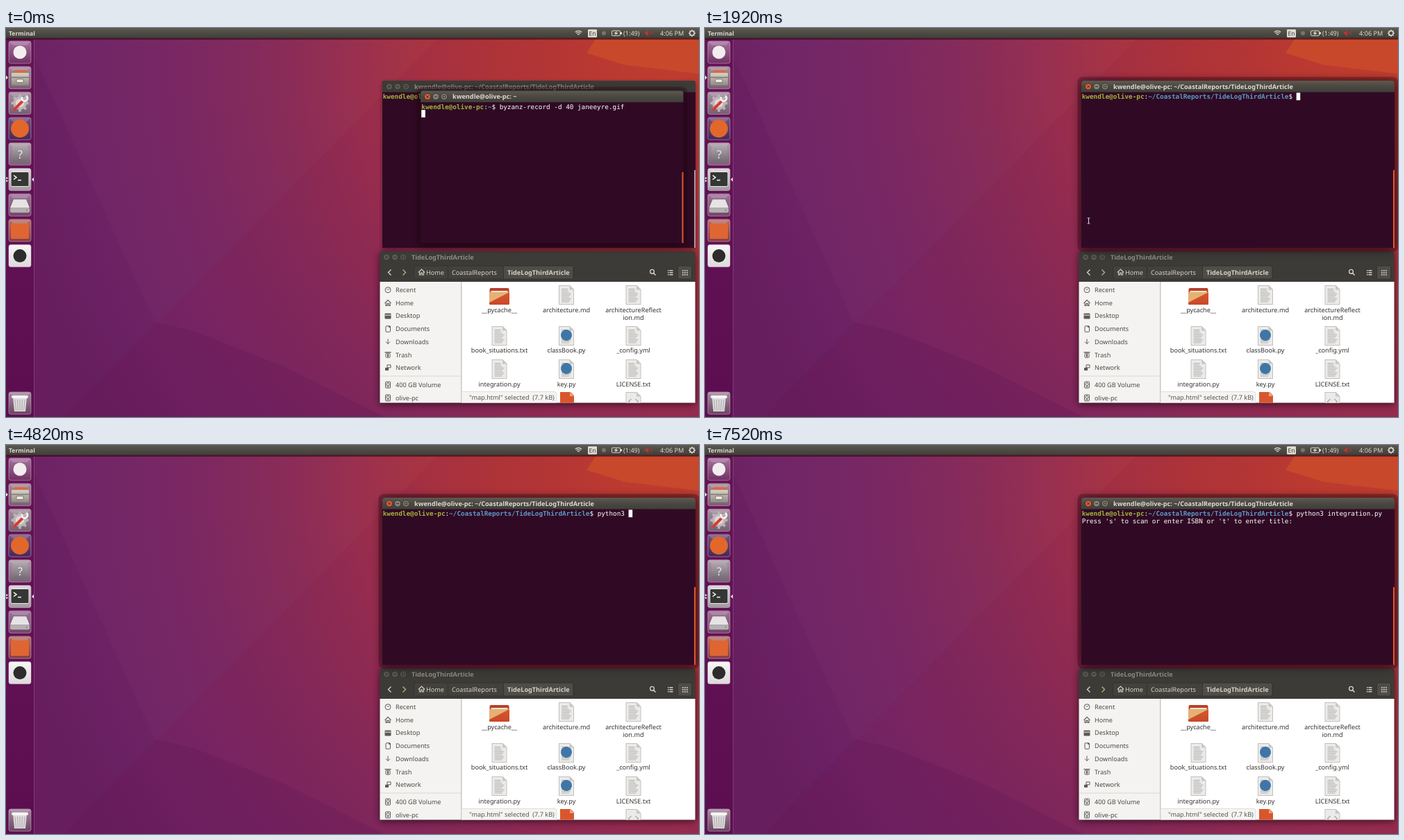
Write an HTML page with a canvas that moves like this. It is 998 by 561 pixels and loops after 8000 ms.

```html
<!DOCTYPE html>
<html lang="en">
<head>
<meta charset="utf-8">
<title>Desktop terminal session</title>
<style>
  html, body { margin: 0; width: 100%; height: 100%; overflow: hidden; background: #6f2566; }
  canvas { display: block; }
</style>
</head>
<body>
<canvas id="stage" width="998" height="561"></canvas>
<script>
const ctx = document.getElementById('stage').getContext('2d');
ctx.textRendering = 'geometricPrecision';

const LOOP = 8000;
const CELL = 5.617, ROW = 10.9;
const MONO = '9.33px "DejaVu Sans Mono", monospace';
const UI = '9.15px "Noto Sans", sans-serif';
const BOLD = 'bold ' + UI;
const USER = 'kwendle@olive-pc', FOLDER = 'CoastalReports', PROJECT = 'TideLogThirdArticle';
const PATH = `~/${FOLDER}/${PROJECT}`;
const COMMAND = 'python3 integration.py ';
const QUESTION = "Press 's' to scan or enter ISBN or 't' to enter title: ";
const KEY_TIMES = [2890, 3080, 3270, 3460, 3560, 3770, 4250, 4820, 5010, 5210, 5300, 5400, 5620, 5850, 5920];
const COMPLETE = 6420, ENTER = 6930, ASK = 7470, RAISE = 1920;

function rect(x, y, w, h, fill) {
  ctx.fillStyle = fill;
  ctx.fillRect(x, y, w, h);
}
function round(x, y, w, h, r, fill, stroke) {
  ctx.beginPath();
  ctx.roundRect(x, y, w, h, r);
  if (fill) { ctx.fillStyle = fill; ctx.fill(); }
  if (stroke) { ctx.strokeStyle = stroke; ctx.lineWidth = 1; ctx.stroke(); }
}
function disc(x, y, r, fill) {
  ctx.beginPath();
  ctx.arc(x, y, r, 0, 7);
  ctx.fillStyle = fill;
  ctx.fill();
}
function ring(x, y, r, color, width = 1, from = 0, to = 7) {
  ctx.beginPath();
  ctx.arc(x, y, r, from, to);
  ctx.strokeStyle = color;
  ctx.lineWidth = width;
  ctx.stroke();
}
function shape(points, fill) {
  ctx.beginPath();
  points.forEach(([x, y]) => ctx.lineTo(x, y));
  ctx.fillStyle = fill;
  ctx.fill();
}
function line(points, color, width = 1) {
  ctx.beginPath();
  points.forEach(([x, y]) => ctx.lineTo(x, y));
  ctx.strokeStyle = color;
  ctx.lineWidth = width;
  ctx.stroke();
}
function text(str, x, y, color, font = UI, align = 'left') {
  ctx.font = font;
  ctx.textAlign = align;
  ctx.fillStyle = color;
  ctx.fillText(str, x, y);
}
function mono(str, x, y, color, bold) {
  [...str].forEach((ch, i) => text(ch, x + i * CELL, y, color, (bold ? 'bold ' : '') + MONO));
}
function addStops(g, colors) {
  colors.forEach((c, i) => g.addColorStop(i / (colors.length - 1), c));
  return g;
}
function vertical(y0, y1, colors) {
  return addStops(ctx.createLinearGradient(0, y0, 0, y1), colors);
}
function withShadow(blur, alpha, draw) {
  ctx.save();
  ctx.shadowColor = `rgba(20,0,10,${alpha})`;
  ctx.shadowBlur = blur;
  ctx.shadowOffsetY = 2;
  draw();
  ctx.restore();
}

function wallpaper() {
  const glow = ctx.createRadialGradient(1000, 40, 0, 1000, 40, 1000);
  rect(0, 0, 998, 561, addStops(glow, ['#c6432d', '#c3402e', '#bb3b33', '#b23838', '#a83442',
    '#993050', '#892c58', '#7e2960', '#762765', '#702567', '#692162']));
  shape([[622, 15], [998, 15], [998, 561], [85, 561]], 'rgba(130,10,60,.1)');
  shape([[40, 40], [214, 424], [85, 561], [40, 561]], 'rgba(70,0,70,.08)');
  shape([[85, 561], [214, 424], [270, 437], [400, 488], [545, 561]], 'rgba(70,0,70,.12)');
  shape([[850, 15], [998, 15], [998, 66], [890, 53], [836, 36]], '#c8482c');
}

function topBar() {
  rect(0, 0, 998, 15, vertical(0, 15, ['#5d5a50', '#4c4a43', '#403e39']));
  rect(0, 14.5, 998, 2.2, 'rgba(45,0,12,.6)');
  const light = '#dfdbd2';
  text('Terminal', 4, 10.5, light, 'bold 8.6px "Noto Sans", sans-serif');
  [2, 4.4, 6.8].forEach(r => ring(824.5, 11, r, light, 1.2, -2.35, -0.8));
  round(838, 2, 13, 11.5, 1, light);
  text('En', 844.5, 10.8, '#3c3b37', '8.6px "Noto Sans", sans-serif', 'center');
  disc(861, 7.5, 3, '#77756d');
  round(872.5, 4, 12, 7, 1, null, light);
  rect(885, 6, 2, 3, light);
  shape([[880, 4.5], [875, 8], [878, 8], [877, 10.5], [882, 7], [879, 7]], light);
  text('(1:49)', 889, 10.7, light);
  shape([[920, 6], [922, 6], [925, 3], [925, 12], [922, 9], [920, 9]], '#c0342c');
  line([[927, 5.5], [931, 9.5]], '#c0342c');
  line([[931, 5.5], [927, 9.5]], '#c0342c');
  text('4:06 PM', 942, 10.7, light);
  gear(988, 7.5, 3.2, light);
}
function gear(x, y, r, color) {
  for (let i = 0; i < 8; i++) {
    const c = Math.cos(i * Math.PI / 4), s = Math.sin(i * Math.PI / 4);
    line([[x + c * r, y + s * r], [x + c * r * 1.55, y + s * r * 1.55]], color, r * .45);
  }
  ring(x, y, r, color, r * .45);
}

const launcherIcons = [
  y => disc(20, y, 9.5, '#f3edf0'),
  y => {
    shape([[9, y - 7], [13, y - 11], [29, y - 11], [32, y - 7]], '#d66b42');
    round(8, y - 7, 25, 18, 1, vertical(y - 7, y + 11, ['#d8d3c8', '#8f8a82']));
    rect(8, y - 1, 25, 1, '#625d58');
    round(15, y + 2, 10, 5, 1, '#eeeae2', '#77716b');
  },
  y => {
    disc(20, y, 9, '#ddd9da');
    gear(20, y, 8, '#bbb5b8');
    line([[11, y + 10], [26, y - 5]], '#d63a2e', 4);
    ring(27, y - 7, 4, '#f3f0f0', 3, -1, 3.6);
  },
  y => disc(20, y, 13, '#e2672a'),
  y => {
    round(9, y - 10, 23, 21, 2, vertical(y - 10, y + 11, ['#aaa2a9', '#746b73']));
    text('?', 20.5, y + 6, '#eee9ed', '16px "Noto Sans", sans-serif', 'center');
  },
  y => {
    round(7, y - 11, 26, 21, 2, '#343733', '#ecebeb');
    line([[11, y - 6], [15, y - 3], [11, y]], '#fff', 1.5);
    line([[17, y + 1], [22, y + 1]], '#fff', 1.5);
  },
  y => {
    shape([[11, y - 8], [29, y - 8], [34, y + 4], [6, y + 4]], '#e6e3e4');
    round(6, y + 4, 28, 7, 2, '#b6b0b4');
    disc(30, y + 7.5, 1.2, '#7aa35a');
  },
  y => round(7, y - 10, 26, 22, 1, '#df6532'),
  y => disc(20, y, 9.5, '#2d2b2c'),
  y => {
    shape([[10, y - 9], [30, y - 9], [28, y + 12], [12, y + 12]], '#dedbdc');
    for (let x = 13; x < 29; x += 3.5) line([[x, y - 5], [x * .8 + 4, y + 11]], '#9f989d', .8);
    round(8, y - 11, 24, 4, 2, '#f6f4f5');
  }
];
const tileColors = [['#a5739e', '#713063'], ['#a58a9d', '#7d5c74'], ['#a58e9f', '#765f72'], ['#76517f', '#42275d'],
  ['#ad9ba9', '#7b5f76'], ['#d8d2d6', '#a298a0'], ['#9d7698', '#724468'], ['#b86d62', '#823f47'],
  ['#f6f4f5', '#dddadc'], ['#a48a9e', '#6a4461']];

function launcher() {
  rect(0, 16, 40, 545, vertical(16, 561, ['#641452', '#611154', '#5b0e4f']));
  rect(40, 16, 1, 545, 'rgba(200,130,180,.3)');
  launcherIcons.forEach((icon, i) => {
    const y = i < 9 ? 35 + i * 36.7 : 541;
    round(4, y - 16, 32, 32, 3, vertical(y - 16, y + 16, tileColors[i]), 'rgba(230,200,225,.45)');
    shape([[5, y - 15], [35, y - 15], [30, y - 10], [10, y - 10]], 'rgba(255,255,255,.18)');
    icon(y);
  });
  shape([[0, 68.5], [3, 71.5], [0, 74.5]], '#e8e0e6');
  rect(0, 215.5, 2.5, 2, '#e8e0e6');
  rect(0, 219.5, 2.5, 2, '#e8e0e6');
  shape([[40, 215.5], [37, 218.5], [40, 221.5]], '#e8e0e6');
}

function windowButtons(x, y, focused) {
  [0, 12, 24].forEach((dx, i) => {
    const isClose = i === 0 && focused;
    const cx = x + dx, ink = focused ? '#3c2f2a' : '#33322e';
    disc(cx, y, 4.6, isClose ? '#df5a35' : focused ? '#858278' : '#5a5952');
    ring(cx, y, 4.6, '#33322e', .8);
    if (i === 0) {
      line([[cx - 1.7, y - 1.7], [cx + 1.7, y + 1.7]], ink);
      line([[cx + 1.7, y - 1.7], [cx - 1.7, y + 1.7]], ink);
    } else if (i === 1) line([[cx - 2, y], [cx + 2, y]], ink);
    else round(cx - 1.7, y - 1.7, 3.4, 3.4, 0, null, ink);
  });
}

function page(cx, top, mark) {
  const x = cx - 11;
  shape([[x, top], [x + 16, top], [x + 22, top + 6], [x + 22, top + 28], [x, top + 28]], '#c2c0bd');
  shape([[x + 1, top + 1], [x + 15.5, top + 1], [x + 21, top + 6.5], [x + 21, top + 27], [x + 1, top + 27]], '#ecebe9');
  shape([[x + 15.5, top + .5], [x + 15.5, top + 6.5], [x + 21.5, top + 6.5]], '#c9c7c4');
  if (mark === 'code') {
    line([[cx - 3, top + 10], [cx - 7, top + 14], [cx - 3, top + 18]], '#aaa', 1.3);
    line([[cx + 3, top + 10], [cx + 7, top + 14], [cx + 3, top + 18]], '#aaa', 1.3);
    return;
  }
  for (let i = 0; i < 9; i++) rect(x + 4, top + 5 + i * 2.3, i < 2 ? 9 : 14 - (i % 3) * 1.5, 1, '#b0aeab');
  if (mark === 'python') disc(cx, top + 13, 8, '#3f76a8');
}
function folder(cx, top) {
  round(cx - 14, top + 4, 28, 23, 2, '#b9402a');
  rect(cx - 12, top + 8, 24, 4, '#efe3d2');
  round(cx - 14.5, top + 10, 29, 18, 1, vertical(top + 10, top + 28, ['#d6592f', '#c9482a']));
  shape([[cx - 14.5, top + 10], [cx + 14.5, top + 10], [cx - 1, top + 18], [cx - 14.5, top + 25]], '#e6b173');
}

const PLACES = ['Recent', 'Home', 'Desktop', 'Documents', 'Downloads', 'Trash', 'Network', '400 GB Volume', 'olive-pc'];
function placeIcon(i, y) {
  const c = '#5b5a55', x = 550;
  if (i === 0) { ring(x, y, 4, c); line([[x - 1.5, y - 1.5], [x, y], [x + 2, y - 2]], c); }
  else if (i === 1) house(x, y, c);
  else if (i === 2) { round(x - 4.5, y - 3.5, 9, 8, 1, c); rect(x - 4.5, y - 1.5, 9, 1, '#f2f1ef'); }
  else if (i === 3) { round(x - 3, y - 4, 6.5, 8.5, 1, null, c); rect(x + 1, y - 4, 2, 2, c); }
  else if (i === 4) { line([[x, y - 4], [x, y + 3]], c); line([[x - 3, y], [x, y + 3], [x + 3, y]], c); }
  else if (i === 5) { round(x - 3, y - 2, 6, 6, 1, null, c); line([[x - 4.5, y - 3.5], [x + 4.5, y - 3.5]], c, 1.3); rect(x - 1, y - 1, 2, 4, c); }
  else if (i === 6) { round(x - 1, y - 4, 5, 4, 0, null, c); round(x - 4, y, 5, 4, 0, c); }
  else { round(x - 3.5, y - 4.5, 7, 9, 1, null, c); ring(x, y - 1, 2, c); rect(x - 2, y + 2, 4, 1, c); }
}
function house(x, y, c) {
  line([[x - 4.5, y + .5], [x, y - 4], [x + 4.5, y + .5]], c, 1.2);
  line([[x - 3, y], [x - 3, y + 4], [x - 1, y + 4], [x - 1, y + 1], [x + 1, y + 1], [x + 1, y + 4], [x + 3, y + 4], [x + 3, y]], c, 1.1);
}

function fileManager() {
  withShadow(12, .7, () => round(538.5, 322, 454, 218.5, [4, 4, 0, 0], '#3c3b37'));
  windowButtons(548, 330.5, false);
  text(PROJECT, 584, 334, '#8f8c83', BOLD);

  const pale = '#d5d1c7';
  line([[554.5, 348.5], [550.5, 352.5], [554.5, 356.5]], pale, 1.4);
  line([[571.5, 348.5], [575.5, 352.5], [571.5, 356.5]], '#b9ad72', 1.4);
  round(587.5, 343, 229.5, 19, 2, '#42413c', '#34332f');
  round(716.5, 343, 100.5, 19, [0, 2, 2, 0], '#4f4d47', '#34332f');
  line([[636.5, 343], [636.5, 362]], '#33322e');
  house(598.5, 352, pale);
  text('Home', 605, 355.7, pale);
  text(FOLDER, 642, 355.7, pale);
  text(PROJECT, 722, 355.7, pale, BOLD);
  ring(930.5, 351.3, 2.9, pale, 1.4);
  line([[932.5, 353.5], [935.5, 356.5]], pale, 1.6);
  round(967.5, 343, 20, 19, 2, '#4f4d47', '#34332f');
  for (let r = 0; r < 3; r++) {
    const y = 349 + r * 3;
    rect(953, y, 1.5, 1.5, pale);
    rect(955.5, y, 5, 1.5, pale);
    for (let c = 0; c < 3; c++) rect(974 + c * 3, y, 1.7, 1.7, pale);
  }

  rect(538.5, 366, 117, 174.5, '#f4f3f1');
  rect(656, 366, 336.5, 174.5, '#fff');
  rect(655, 366, 1.5, 174.5, '#c9c7c2');
  PLACES.forEach((name, i) => {
    const y = i < 7 ? 377.7 + i * 18.7 : 514.7 + (i - 7) * 18.7;
    placeIcon(i, y);
    text(name, 561, y + 3.3, '#4b4a43');
  });
  rect(539, 501.5, 116, 1, '#dad8d4');

  const columns = [710.5, 807, 903.5], ink = '#333';
  const files = [['__pycache__', 'architecture.md', 'architectureReflect'],
    ['book_situations.txt', 'classBook.py', '_config.yml'],
    ['integration.py', 'key.py', 'LICENSE.txt']];
  const tops = [371, 430, 478], baselines = [410, 468.3, 516.5];
  files.forEach((row, r) => row.forEach((name, c) => {
    if (r + c === 0) folder(columns[c], tops[r]);
    else page(columns[c], tops[r], c === 1 && r > 0 ? 'python' : '');
    text(name, columns[c], baselines[r], ink, UI, 'center');
  }));
  text('ion.md', 903.5, 420.5, ink, UI, 'center');

  ctx.save();
  ctx.beginPath();
  ctx.rect(656, 366, 336, 174.5);
  ctx.clip();
  shape([[798, 525], [813, 525], [818, 530], [818, 553], [798, 553]], '#d9562c');
  shape([[812, 525], [812, 531], [818, 531]], '#f0a27e');
  page(903.5, 525, 'code');
  round(656, 524.5, 137, 18, [0, 3, 0, 0], '#f5f4f3', '#e0deda');
  text('"map.html" selected  (7.7 kB)', 667, 535.5, '#56554f');
  ctx.restore();
}

function terminal(x, y, w, h, title, focused) {
  const bar = 16.5;
  if (focused) round(x - 5.5, y - 5.5, w + 11, h + 11, 8, 'rgba(45,8,22,.35)');
  withShadow(focused ? 16 : 6, focused ? .7 : .45, () => round(x, y, w, h, [4, 4, 0, 0], '#300a24'));
  round(x, y, w, bar, [4, 4, 0, 0], focused ? vertical(y, y + bar, ['#5c5a51', '#4a4841', '#403e39']) : '#3c3b37');
  windowButtons(x + 10, y + 8.5, focused);
  text(title, x + 46, y + 11.8, focused ? '#dfdbd2' : '#8f8c83', BOLD);
  const thumb = h * .465;
  rect(x + w - 2, y + h - thumb, 2, thumb, focused ? '#e2572e' : '#a39da1');
}
function prompt(x, y, path) {
  mono(USER, x, y, '#a3b43c', true);
  mono(':', x + 16 * CELL, y, '#fff');
  mono(path, x + 17 * CELL, y, '#5d9ac8', true);
  mono('$ ', x + (17 + path.length) * CELL, y, '#fff');
  return x + (19 + path.length) * CELL;
}
function block(x, y) { rect(x, y, CELL, 10.8, '#fff'); }

function pointer(t) {
  if (t < 1540 || t >= 2930) return;
  const k = Math.min(4, Math.floor((t - 1540) / 50)) / 4;
  const x = 536.5 + 16 * k, y = 275 + 3 * k;
  if (x < 542) {
    shape([[x, y], [x, y + 12], [x + 3, y + 9.5], [x + 5, y + 14], [x + 7, y + 13], [x + 5, y + 8.8], [x + 9, y + 8.5]], '#fff');
    line([[x, y], [x, y + 12], [x + 3, y + 9.5], [x + 9, y + 8.5], [x, y]], '#111', .7);
  } else {
    line([[x, y - 4], [x, y + 4]], '#ddd');
    line([[x - 2, y - 4], [x + 2, y - 4]], '#ddd', .8);
    line([[x - 2, y + 4], [x + 2, y + 4]], '#ddd', .8);
  }
}

function recordingScene(t) {
  terminal(542, 76, 451, 241, `${USER}: ${PATH}`, false);
  prompt(542.7, 102.2, PATH);
  terminal(597, 90.5, 378.5, 219.5, `${USER}: ~`, true);
  const x = prompt(598.3, 116.6, '~');
  mono('byzanz-record -d 40 janeeyre.gif', x, 116.6, '#fff');
  if (t < 550 || (t >= 1150 && t < 1740)) block(598.2, 118.2);
}
function typingScene(t) {
  terminal(542, 76, 451, 241, `${USER}: ${PATH}`, true);
  const start = prompt(542.7, 102.2, PATH);
  const typed = t >= COMPLETE ? COMMAND.length : KEY_TIMES.filter(k => t >= k).length;
  mono(COMMAND.slice(0, typed), start, 102.2, '#fff');
  if (t >= ASK) mono(QUESTION, 542.7, 102.2 + ROW, '#fff');
  const hidden = (t >= 2510 && t < KEY_TIMES[0]) || t >= 7520;
  if (hidden) return;
  if (t < ENTER) block(start + typed * CELL, 93.4);
  else block(542.7 + (t >= ASK ? QUESTION.length : 0) * CELL, 93.4 + ROW);
}

function frame() {
  const t = performance.now() % LOOP;
  wallpaper();
  fileManager();
  (t < RAISE ? recordingScene : typingScene)(t);
  launcher();
  topBar();
  pointer(t);
  requestAnimationFrame(frame);
}
frame();
</script>
</body>
</html>
```
